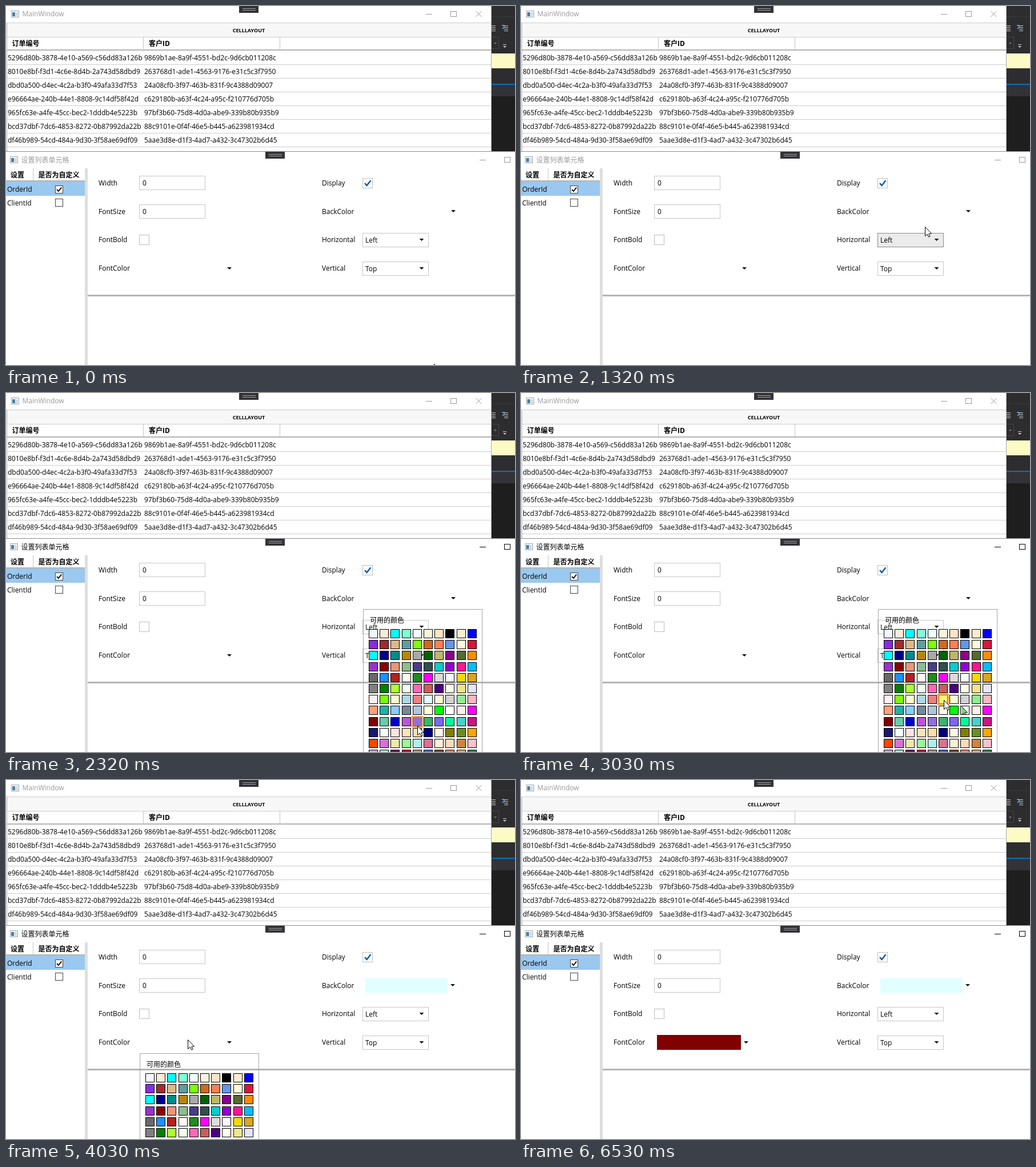
These frames come from a looping animation (891x628 px, 8000 ms). An HTML page with a canvas:

```html
<!DOCTYPE html>
<html lang="zh">
<head>
<meta charset="utf-8">
<title>MainWindow</title>
<style>
  html, body { margin: 0; width: 100%; height: 100%; overflow: hidden; background: #fff; }
  canvas { display: block; }
</style>
</head>
<body>
<canvas id="stage" width="891" height="628"></canvas>
<script>
const ctx = document.getElementById('stage').getContext('2d');
const LOOP = 8000, STEP = 77;
const FAMILY = "'Open Sans', 'Noto Sans CJK SC', 'Noto Sans CJK', sans-serif";

const ORDERS = [
  ['5296d80b-3878-4e10-a569-c56dd83a126b', '9869b1ae-8a9f-4551-bd2c-9d6cb011208c'],
  ['8010e8bf-f3d1-4c6e-8d4b-2a743d58dbd9', '263768d1-ade1-4563-9176-e31c5c3f7950'],
  ['dbd0a500-d4ec-4c2a-b3f0-49afa33d7f53', '24a08cf0-3f97-463b-831f-9c4388d09007'],
  ['e96664ae-240b-44e1-8808-9c14df58f42d', 'c629180b-a63f-4c24-a95c-f210776d705b'],
  ['965fc63e-a4fe-45cc-bec2-1dddb4e5223b', '97bf3b60-75d8-4d0a-abe9-339b80b935b9'],
  ['bcd37dbf-7dc6-4853-8272-0b87992da22b', '88c9101e-0f4f-46e5-b445-a623981934cd'],
  ['df46b989-54cd-484a-9d30-3f58ae69df09', '5aae3d8e-d1f3-4ad7-a432-3c47302b6d45'],
];

const SWATCHES = `AliceBlue AntiqueWhite Aqua Aquamarine Azure Beige Bisque Black BlanchedAlmond Blue
BlueViolet Brown BurlyWood CadetBlue Chartreuse Chocolate Coral CornflowerBlue Cornsilk Crimson
Cyan DarkBlue DarkCyan DarkGoldenrod DarkGray DarkGreen DarkKhaki DarkMagenta DarkOliveGreen DarkOrange
DarkOrchid DarkRed DarkSalmon DarkSeaGreen DarkSlateBlue DarkSlateGray DarkTurquoise DarkViolet DeepPink DeepSkyBlue
DimGray DodgerBlue Firebrick FloralWhite ForestGreen Fuchsia Gainsboro GhostWhite Gold Goldenrod
Gray Green GreenYellow Honeydew HotPink IndianRed Indigo Ivory Khaki Lavender
LavenderBlush LawnGreen LemonChiffon LightBlue LightCoral LightCyan LightGoldenrodYellow LightGray LightGreen LightPink
LightSalmon LightSeaGreen LightSkyBlue LightSlateGray LightSteelBlue LightYellow Lime White Linen Magenta
Maroon MediumAquamarine MediumBlue MediumOrchid MediumPurple MediumSeaGreen MediumSlateBlue MediumSpringGreen MediumTurquoise MediumVioletRed
MidnightBlue MintCream MistyRose Moccasin NavajoWhite Navy OldLace Olive OliveDrab Orange
OrangeRed Orchid PaleGoldenrod PaleGreen PaleTurquoise PaleVioletRed PapayaWhip PeachPuff Peru Pink
Plum PowderBlue Purple Red RosyBrown RoyalBlue SaddleBrown Salmon SandyBrown SeaGreen`.split(/\s+/);

// Pointer path: [time, x, y]
const PATH = [
  [0, 749, 626], [70, 735, 610], [330, 420, 470], [530, 193, 400], [840, 330, 300],
  [1100, 560, 400], [1230, 680, 415], [1300, 707, 386], [1395, 707, 386],
  [1680, 768, 343], [1760, 768, 343], [1840, 769, 369], [2080, 769, 369],
  [2300, 720, 582], [2380, 720, 582], [2840, 770, 548], [2900, 770, 548],
  [2960, 740, 537], [3105, 740, 537], [3690, 307, 446], [3750, 307, 446],
  [3820, 318, 444], [3890, 317, 447], [3980, 318, 454], [4270, 318, 454],
  [4900, 262, 632], [5690, 262, 632], [5850, 330, 600], [6450, 701, 576], [8000, 701, 576],
];

function rect(x, y, w, h, color) {
  ctx.fillStyle = color;
  ctx.fillRect(x, y, w, h);
}

function box(x, y, w, h, border, fill) {
  if (fill) rect(x, y, w, h, fill);
  ctx.strokeStyle = border;
  ctx.lineWidth = 1;
  ctx.strokeRect(x + .5, y + .5, w - 1, h - 1);
}

function text(str, x, y, { color = '#000', size = 12, bold = false, align = 'left' } = {}) {
  ctx.font = `${bold ? 'bold ' : ''}${size}px ${FAMILY}`;
  ctx.fillStyle = color;
  ctx.textAlign = align;
  ctx.fillText(str, x, y);
}

function line(points, color, width) {
  ctx.beginPath();
  points.forEach(([x, y]) => ctx.lineTo(x, y));
  ctx.strokeStyle = color;
  ctx.lineWidth = width;
  ctx.stroke();
}

function polygon(x, y, points, fill, stroke) {
  ctx.beginPath();
  points.forEach(([dx, dy]) => ctx.lineTo(x + dx, y + dy));
  ctx.closePath();
  ctx.fillStyle = fill;
  ctx.fill();
  if (stroke) {
    ctx.strokeStyle = stroke;
    ctx.lineWidth = 1;
    ctx.stroke();
  }
}

const arrow = (x, y) => polygon(x, y, [[-4, -2], [4, -2], [0, 2]], '#111');

const pointer = (x, y, fill = '#fff') => polygon(x + .5, y + .5,
  [[0, 0], [0, 16], [3.7, 12.6], [6.2, 17.6], [8.6, 16.6], [6.3, 11.8], [11, 11.5]], fill, '#000');

function checkBox(x, y, size, border, tick) {
  box(x, y, size, size, border, '#fff');
  if (!tick) return;
  const at = (u, v) => [x + u * size, y + v * size];
  line([at(.22, .5), at(.42, .72), at(.8, .24)], tick, size / 7);
}

function combo(y, label, hovered) {
  box(624, y, 116, 25, hovered ? '#8a8a8a' : '#c6c6c6', hovered ? '#ebebeb' : '#fff');
  text(label, 629, y + 17);
  arrow(727.5, y + 12);
}

function textBox(y) {
  box(233, y, 116, 25, '#c6c6c6', '#fff');
  text('0', 239, y + 17);
}

function windowIcon(x, y) {
  box(x, y, 14, 12, '#a3a9b0', '#f4f6f8');
  rect(x + 2, y + 3, 5, 7, '#4a7fa5');
  rect(x + 8, y + 3, 4, 7, '#d5dade');
}

function minMax(x, y, color) {
  rect(x, y, 11, 1, color);
  box(x + 43, y - 5, 11, 10, color);
}

function badge(x, y) {
  rect(x, y, 34, 12, '#333337');
  rect(x + 6, y + 4, 23, 1, '#a5a5a5');
  rect(x + 6, y + 7, 23, 1, '#a5a5a5');
}

function editorEdge() {
  rect(850, 0, 41, 255, '#2d2d30');
  rect(850, 18, 41, 1, '#3a3a3d');
  for (let i = 0; i < 4; i++) rect(850, 34 + i * 3, 7, 1, '#c8c8c8');
  for (let i = 0; i < 4; i++) rect(872, 34 + i * 3, 7, 1, '#c8c8c8');
  line([[868, 34], [872, 34], [872, 37], [869, 40]], '#6fb4e8', 1.5);
  box(849, 54, 14, 21, '#46464a');
  polygon(856, 65, [[-2, -1], [3, -1], [.5, 2]], '#77777a');
  rect(870, 67, 6, 1, '#ccc');
  polygon(873, 71, [[-3, -1], [3, -1], [0, 2]], '#ccc');
  rect(850, 83, 41, 26, '#fdfbc5');
  rect(850, 136, 41, 2, '#0a70b8');
  rect(850, 138, 41, 20, '#333337');
  rect(850, 158, 41, 97, '#1e1e1e');
}

function mainWindow() {
  rect(0, 0, 850, 255, '#fff');
  windowIcon(9, 8);
  text('MainWindow', 28.5, 18, { color: '#999' });
  minMax(735, 14, '#999');
  line([[822.5, 9], [832.5, 19]], '#999', 1);
  line([[832.5, 9], [822.5, 19]], '#999', 1);
  badge(408, 0);

  box(1, 29, 849, 26, '#ccc', '#f7f7f7');
  text('CELLLAYOUT', 425, 46, { size: 9, bold: true, align: 'center' });
  text('订单编号', 10.5, 70, { bold: true });
  text('客户ID', 250, 70, { bold: true });
  rect(240, 55, 1, 21, '#c4c4c4');
  rect(479, 55, 1, 21, '#c4c4c4');
  rect(2, 76, 848, 2, '#b4b4b4');
  ORDERS.forEach(([order, client], i) => {
    const y = 95 + i * 24;
    text(order, 3, y);
    text(client, 242, y);
    rect(2, y + 7, 848, 1, '#cdcdcd');
  });
  rect(1, 29, 1, 226, '#aaa');
  rect(849, 0, 1, 255, '#aaa');
}

function settingsWindow(t) {
  const color = t >= 1710 ? '#000' : '#999';
  rect(0, 254, 891, 374, '#fff');
  rect(0, 254, 891, 1, '#8c8c8c');
  windowIcon(7, 263);
  text('设置列表单元格', 26.5, 273.5, { color });
  minMax(829, 269, color);
  badge(454, 255);

  text('设置', 8, 300, { bold: true });
  text('是否为自定义', 56.5, 300, { bold: true });
  rect(47, 284, 1, 21, '#c4c4c4');
  rect(0, 305, 138, 2, '#b4b4b4');
  rect(0, 307, 138, 25, '#9ac8ef');
  text('OrderId', 2, 325);
  text('ClientId', 2, 349);
  checkBox(86, 314, 14, '#444', '#111');
  checkBox(86, 337, 14, '#444');
  rect(138, 284, 5, 344, '#dedede');
  rect(143, 505, 748, 3, '#b4b4b4');

  ['Width', 'FontSize', 'FontBold', 'FontColor'].forEach((s, i) => text(s, 162, 314 + Math.round(i * 49.7)));
  ['Display', 'BackColor', 'Horizontal', 'Vertical'].forEach((s, i) => text(s, 553, 314 + Math.round(i * 49.7)));
  textBox(297);
  textBox(347);
  checkBox(233, 400, 18, '#bdbdbd');
  checkBox(624, 301, 18, '#bdbdbd', '#0f5ea8');
  combo(397, 'Left', t >= 1180 && t < 1390);
  combo(447, 'Top', false);

  const backSet = t >= 3100, fontSet = t >= 5690;
  if (backSet) rect(629, 347, 144, 25, 'LightCyan');
  arrow(backSet ? 782 : 783, 359);
  if (fontSet) rect(238, 446, 147, 26, 'Maroon');
  arrow(fontSet ? 394 : 391, 459);
}

function palette(left, top, [px, py], pressed) {
  const PITCH = 19.2;
  box(left, top, 209, 300, '#a6a6a6');
  text('可用的颜色', left + 12, top + 24);
  const hoverCol = Math.floor((px - left - 9) / PITCH);
  const hoverRow = Math.floor((py - top - 33) / PITCH);
  SWATCHES.forEach((name, i) => {
    const col = i % 10, row = Math.floor(i / 10);
    const x = left + 10 + Math.round(col * PITCH);
    const y = top + 35 + Math.round(row * PITCH);
    const hovered = col === hoverCol && row === hoverRow;
    if (hovered) box(x - 2, y - 2, 20, 20, '#e8741e', pressed ? '#ffe860' : '#ffd58a');
    box(x, y, 16, 16, hovered ? '#c8401c' : '#000', hovered && pressed ? '#fbf27c' : name);
  });
}

// Clipped trace of the pointer left behind inside one swatch.
function pointerTrace() {
  ctx.save();
  ctx.beginPath();
  ctx.rect(771, 548, 13, 14);
  ctx.clip();
  pointer(770, 547, '#8fcf8f');
  ctx.restore();
}

function pointerAt(t) {
  const q = t < 70 ? 0 : 70 + Math.floor((t - 70) / STEP) * STEP;
  const i = PATH.findIndex(key => key[0] > q);
  const [t0, x0, y0] = PATH[i - 1], [t1, x1, y1] = PATH[i];
  const k = (q - t0) / (t1 - t0);
  return [Math.round(x0 + (x1 - x0) * k), Math.round(y0 + (y1 - y0) * k)];
}

function draw(t) {
  const position = pointerAt(t);
  const pressed = t >= 2960 && t < 3180;
  editorEdge();
  mainWindow();
  settingsWindow(t);
  if (t >= 1860 && t < 3180) palette(625, 378, position, pressed);
  if (t >= 4030 && t < 5760) palette(234, 478, position, false);
  if (pressed) pointerTrace();
  if (t < 6530) pointer(...position);
}

function tick() {
  draw(performance.now() % LOOP);
  requestAnimationFrame(tick);
}
tick();
</script>
</body>
</html>
```
